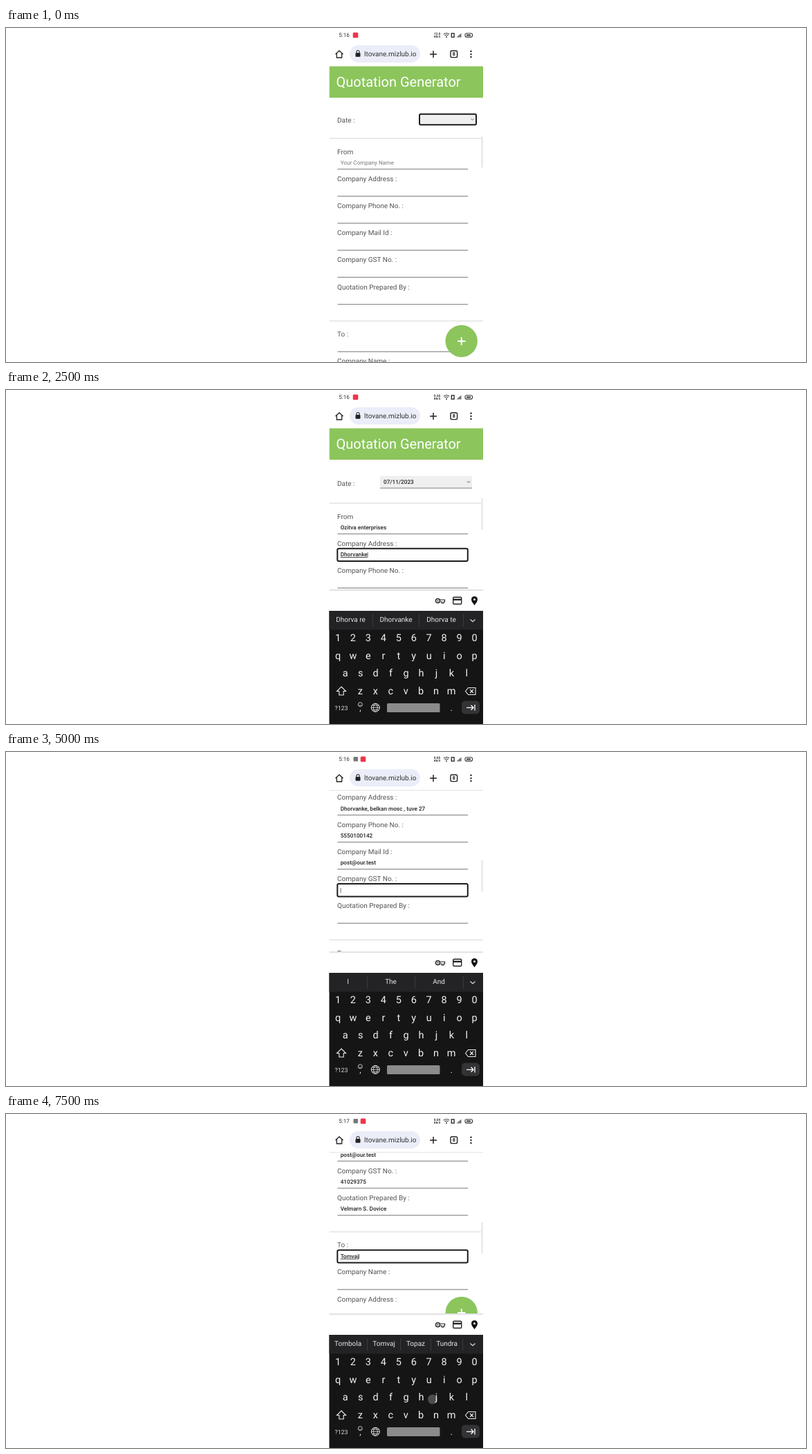
Animation of 1157 by 484 pixels, one loop 8 s. Source, as an HTML page:

```html
<!DOCTYPE html>
<html lang="en">
<head>
<meta charset="utf-8">
<title>Quotation form</title>
<style>
  html, body { margin: 0; width: 100%; height: 100%; overflow: hidden; background: #fff; }
  svg { display: block; width: 100vw; height: 100vh; font-family: Roboto, sans-serif; text-rendering: geometricPrecision; }
  .words { display: flex; height: 27px; align-items: center; font: 10px Roboto, sans-serif; color: #e6e6e6; }
  .words span { flex: 1 1 auto; text-align: center; line-height: 18px; border-right: 1px solid #3a3a3c; }
</style>
</head>
<body>
<svg id="stage" viewBox="0 0 1157 484"></svg>
<script>
const GREEN = '#8bc55c', BLUE = '#0b57d6', STEP = 500, LOOP = 8000, ROW = 39.2;

// Each field: label, distance below the first label, completed value
const fields = [
  ['From', 0, 'Ozitva enterprises'],
  ['Company Address :', ROW, 'Dhorvanke, belkan mosc , tuve 27'],
  ['Company Phone No. :', ROW * 2, '5550100142'],
  ['Company Mail Id :', ROW * 3, 'post@our.test'],
  ['Company GST No. :', ROW * 4, '41029375'],
  ['Quotation Prepared By :', ROW * 5, 'Velmarn S. Dovice'],
  ['To :', 264.5, ''],
  ['Company Name :', 264.5 + ROW, ''],
  ['Company Address :', 264.5 + ROW * 2, '']
];

// focus = index of the field being typed in; no words = language strip
const states = [
  { speed: '12.0' },
  { speed: '12.0', calendar: true },
  { speed: '1.20', date: true },
  { speed: '0.85', focus: 0, typed: 4, words: 'Vast,Ozit,Kettle,Gauze,Omit', touch: [559.5, 387, '#8a8a8a'] },
  { speed: '0.40', focus: 0, typed: 13, words: 'enter,entered,enterprise' },
  { speed: '0.30', focus: 1, typed: 9, words: 'Dhorva re,Dhorvanke,Dhorva te' },
  { speed: '0.24', focus: 1, typed: 20, words: 'most,mos,moss,move' },
  { speed: '0.22', focus: 1, typed: 32, words: 'and,is,the,to' },
  { speed: '0.20', focus: 3, typed: 4, scroll: 81, words: 'posts,post,host,most,cost' },
  { speed: '0.12', focus: 3, typed: 10, scroll: 81, words: 'test,text,the,to,tea' },
  { speed: '0.05', focus: 4, typed: 0, scroll: 156.3, words: 'I,The,And' },
  { speed: '0.02', focus: 4, typed: 4, scroll: 156.3, fab: 297.5 },
  { speed: '0.10', focus: 5, typed: 2, scroll: 156.3, fab: 297.5, words: 'Very,Vest,Veil,Vent' },
  { speed: '0.08', focus: 5, typed: 9, scroll: 156.3, fab: 297.5, words: 'So,See,Some,She' },
  { speed: '0.06', focus: 6, text: '', scroll: 257.8, fab: 288, words: 'I,The,And' },
  { speed: '0.04', focus: 6, text: 'Tomvaj', scroll: 257.8, fab: 288, words: 'Tombola,Tomvaj,Topaz,Tundra', touch: [617, 413.5, '#4c4c50'] }
];

const text = (x, y, s, size, fill = '#333', more = '') =>
  `<text x="${x}" y="${y}" font-size="${size}" fill="${fill}" ${more}>${s}</text>`;
const mid = (x, y, s, size, fill, more = '') => text(x, y, s, size, fill, `text-anchor="middle" ${more}`);
const rect = (x, y, w, h, fill, more = '') =>
  `<rect x="${x}" y="${y}" width="${w}" height="${h}" fill="${fill}" ${more}/>`;
const line = (d, color = '#222', width = 1.3) =>
  `<path d="${d}" fill="none" stroke="${color}" stroke-width="${width}"/>`;
const disc = (x, y, r, fill, more = '') => `<circle cx="${x}" cy="${y}" r="${r}" fill="${fill}" ${more}/>`;
const ring = (x, y, w, h) => rect(x, y, w, h, 'none', 'rx="2" stroke="#1c1c1c" stroke-width="2"');
const MEDIUM = 'font-weight="500"', BOLD = 'font-weight="700"';

function browserBar() {
  return rect(467.5, 0, 222.5, 55, '#fff')
    + line('M476.5 38l5.5-5 5.5 5M478.3 37v6h7.4v-6')
    + rect(497, 25, 102, 25, '#ebeef9', 'rx="12.5"')
    + rect(505.5, 36, 7, 5.8, '#222', 'rx="1"') + line('M507 36v-1.5a2 2 0 0 1 4 0v1.5', '#222', 1.1)
    + '<clipPath id="address"><rect x="518" y="28" width="78" height="20"/></clipPath>'
    + text(593.5, 41.4, 'iltovane.mizlub.io', 10, '#333', 'text-anchor="end" clip-path="url(#address)"')
    + line('M613 38h10M618 33v10', '#222', 1.5)
    + rect(643, 33, 9.6, 9.6, 'none', 'rx="1.8" stroke="#222" stroke-width="1.4"')
    + mid(647.8, 40.4, '8', 7, '#222', BOLD)
    + [33.8, 37.9, 42].map(y => disc(672.5, y, 1.2, '#222')).join('');
}

// Stays above the dimmed page, with light icons while the dialog is open
function statusBar(s, step) {
  const late = step >= 8, red = late ? 516.5 : 505.5, ink = s.calendar ? '#fff' : '#333';
  return text(481.3, 13.4, step >= 13 ? '5:17' : '5:16', 8.1, ink)
    + (late ? rect(502.5, 7, 6.5, 6.5, '#777', 'rx="1"') : '')
    + rect(red - 3.8, 6.6, 7.6, 7.6, s.calendar ? '#d8283a' : '#f0344a', 'rx="1.5"')
    + mid(623.5, 10, s.speed, 4.8, ink, BOLD)
    + mid(623.5, 14.2, 'KB/S', 4.2, ink, BOLD)
    + line('M633 9q4-3 8 0M634.5 11q2.5-2 5 0', ink, 1.2) + disc(637, 13, 1, ink)
    + rect(644.3, 7.8, 3.8, 5.4, 'none', `stroke="${ink}" stroke-width="1.4"`)
    + `<path d="M651.5 13.5h7v-6z" fill="${ink}" opacity=".7"/>`
    + rect(664, 7.7, 10.5, 5.4, 'none', `rx="2" stroke="${ink}" stroke-width="1.1"`) + rect(666, 9.4, 6, 2, ink);
}

function dateRow(s, y, filled) {
  if (!filled) return text(479, y - 42, 'Date :', 10, '#555')
    + rect(598, y - 54.3, 82, 15.5, '#efefef') + ring(598, y - 54.3, 82, 15.5)
    + line(`M672.5 ${y - 47.5}l2 2 2-2`, '#555', .9);
  return text(479, y - 44, 'Date :', 10, '#555')
    + rect(541, y - 58.5, 133, 17.5, '#efefef')
    + (s.date ? ring(541, y - 58.5, 133, 17.5) : rect(541, y - 41.5, 133, 1.3, '#999'))
    + text(546, y - 47, '07/11/2023', 8.2, '#222', MEDIUM)
    + line(`M666.8 ${y - 51}l2.3 2.3 2.3-2.3`, '#555', .9);
}

function fieldRow(s, [label, dy, value], i, top) {
  const y = top + dy, active = i === s.focus, base = y + 19;
  let out = text(479, y + 3.5, label, 10, '#555');
  out += active ? ring(479.3, y + 7.5, 188.5, 18.4) : rect(479.5, y + 24.8, 188.5, 1.4, '#9a9a9a');
  if (active) {
    const typed = s.text ?? value.slice(0, s.typed);
    const cut = typed.lastIndexOf(' ') + 1, word = typed.slice(cut);
    const mark = /\d/.test(word) ? '' : 'text-decoration="underline"';
    out += text(483.7, base, `${typed.slice(0, cut)}<tspan ${mark}>${word}</tspan><tspan dx="-.7">|</tspan>`,
      8.2, '#222', MEDIUM);
  } else if (i < s.focus) {
    out += text(483.7, base, value, 8.2, '#222', MEDIUM);
  } else if (i === 0) {
    out += text(483.7, base, 'Your Company Name', 8.2, '#777');
  }
  return out;
}

function page(s, step) {
  const filled = step >= 2, typing = s.focus !== undefined, scroll = s.scroll || 0;
  const top = (filled ? 183 : 179) - scroll, fab = s.fab || (typing ? 400 : 453.7);
  const divider = y => rect(467.5, y - 1, 222.5, 2, '#e9e9e9');
  return `<clipPath id="view"><rect x="467.5" y="55" width="222.5" height="${typing ? 235 : 429}"/></clipPath>
    <g clip-path="url(#view)">`
    + rect(467.5, 55.5 - scroll, 222.5, 45.5, GREEN)
    + text(477.5, 84.7 - scroll, 'Quotation Generator', 20, '#fff')
    + dateRow(s, top, filled) + divider(top - 19) + divider(top + 245.5)
    + fields.map((f, i) => fieldRow(s, f, i, top)).join('')
    + (scroll ? rect(467.5, 55, 222.5, .8, '#ddd') : '')
    + disc(658.7, fab, 23.2, GREEN)
    + line(`M653 ${fab}h11.4M658.7 ${fab - 5.7}v11.4`, '#fff', 2)
    + rect(687, 156.5, 3, 46, '#ececec', 'rx="1.5"') + '</g>';
}

function calendar() {
  const colX = c => 513 + c * 21.83;
  let out = rect(467.5, 0, 222.5, 484, '#000', 'opacity=".56"')
    + rect(489.5, 101, 178, 302, '#fff', 'rx="2" style="filter:drop-shadow(0 4px 6px #0007)"')
    + rect(489.5, 101, 178, 57.5, BLUE)
    + text(504, 120.6, '2023', 10.2, '#dbe6fb') + text(503.3, 142.9, 'Mon, Jul 10', 21.2, '#fff', MEDIUM)
    + line('M515 176.7l-3.5 3.3 3.5 3.3M642.5 176.7l3.5 3.3-3.5 3.3', '#222', 1.5)
    + mid(578.5, 183, 'July 2023', 8.6, '#222', MEDIUM)
    + disc(colX(2), 281.3, 12.4, '#e2e2e2') + disc(colX(1), 281.3, 12.4, BLUE);
  [...'SMTWTFS'].forEach((d, c) => out += mid(colX(c), 210.8, d, 7.5, '#555', MEDIUM));
  for (let day = 1; day <= 31; day++) {
    const cell = day + 5;
    out += mid(colX(cell % 7), 234.3 + Math.floor(cell / 7) * 24.8, day, 7.7, day === 10 ? '#fff' : '#222', MEDIUM);
  }
  out += disc(566, 278.5, 7, '#f6f6fa', 'stroke="#b9bfd2" stroke-width=".9"');
  [[509, 'CLEAR'], [560, 'CANCEL'], [624, 'SET']].forEach(([x, s]) =>
    out += text(x, 388.7, s, 8.4, BLUE, BOLD + ' letter-spacing=".9"'));
  return out;
}

function strip(words) {
  if (words) return '<foreignObject x="467.5" y="320.5" width="194" height="27"><div class="words">'
    + words.split(',').map(w => `<span>${w}</span>`).join('') + '</div></foreignObject>'
    + line('M671.5 332.5l3.5 3.3 3.5-3.3', '#ddd', 1.2);
  return rect(514, 320, 46, 28, '#151515') + mid(537, 338.5, 'abc', 12, '#fff', MEDIUM)
    + line('M485 329.5h12M491 329.5v3M491 335c-1-4-6-3-5 0s4 2 5 0c1-4 6-4 5-.5s-4 3-5 .5', '#eee', 1.2)
    + rect(672.3, 328, 3.6, 7, '#ddd', 'rx="1.8"') + line('M670 333.5a4.1 4.1 0 0 0 8.2 0M674.1 337.5v2.5', '#ddd', 1.1);
}

function keyboard(s) {
  const keys = (letters, x, y) => [...letters].map((k, i) => mid(x + i * 21.95, y, k, 14.5, '#f2f2f2')).join('');
  const white = '#eee';
  return rect(467.5, 290, 222.5, 30, '#fff') + rect(467.5, 289, 222.5, 2, '#e2e2e2')
    + disc(624.5, 305.5, 3, 'none', 'stroke="#222" stroke-width="1.4"') + disc(624.5, 305.5, 1, '#222')
    + line('M627 304h7.5v3h-1.5v2h-2.5v-2h-3.2', '#222', 1.2)
    + rect(646.7, 300.3, 12, 10, 'none', 'rx="1.3" stroke="#222" stroke-width="1.4"') + rect(646.7, 302.5, 12, 2.4, '#222')
    + '<path d="M677.5 312c-3-4-4.5-6-4.5-8.5a4.5 4.5 0 0 1 9 0c0 2.5-1.5 4.5-4.5 8.5z" fill="#111"/>'
    + disc(677.5, 303.5, 1.5, '#fff')
    + rect(467.5, 320, 222.5, 164, '#151515') + rect(467.5, 320, 222.5, 27.5, '#232325') + strip(s.words)
    + (s.touch ? disc(s.touch[0], s.touch[1], 7, s.touch[2]) : '')
    + keys('1234567890', 480, 364.4) + keys('qwertyuiop', 480, 389.7)
    + keys('asdfghjkl', 490.7, 415.2) + keys('zxcvbnm', 512.3, 440.7)
    + line('M485 430l6.5 6.5h-3.3v5.5h-6.4v-5.5h-3.3z', white, 1.1)
    + line('M664.5 436.5l4-5h10.5v10h-10.5zM671 434l5 5m0-5l-5 5', white, 1.1)
    + mid(485, 463.5, '?123', 8.8, '#ddd')
    + (s.focus === 3 ? mid(512.5, 464, '@', 11.5, white)
      : disc(512.3, 455.7, 3, 'none', 'stroke="#ddd" stroke-width=".9"')
        + line('M510.8 456.5q1.5 1.5 3 0', '#ddd', .7) + mid(512.5, 464.5, ',', 12, white))
    + disc(534.3, 460.3, 6, 'none', 'stroke="#eee" stroke-width="1"')
    + line('M528.3 460.3h12M529.5 457h9.6M529.5 463.6h9.6M534.3 454.3c-4 4-4 8 0 12c4-4 4-8 0-12', white, .8)
    + rect(551, 454, 76.5, 13, '#8b8b8b', 'rx="1.5"') + mid(644.2, 464.5, '.', 13, white)
    + rect(659, 450.5, 26, 19, '#333336', 'rx="5"')
    + line('M666 460.3h10M672.5 456.8l3.5 3.5-3.5 3.5M678 456v8.6', '#fff', 1.3);
}

const stage = document.getElementById('stage');
let shown = -1;
function draw() {
  const step = Math.floor(performance.now() % LOOP / STEP);
  if (step !== shown) {
    const s = states[step];
    stage.innerHTML = page(s, step) + browserBar() + (s.calendar ? calendar() : '')
      + statusBar(s, step) + (s.focus !== undefined ? keyboard(s) : '');
    shown = step;
  }
  requestAnimationFrame(draw);
}
draw();
</script>
</body>
</html>
```
